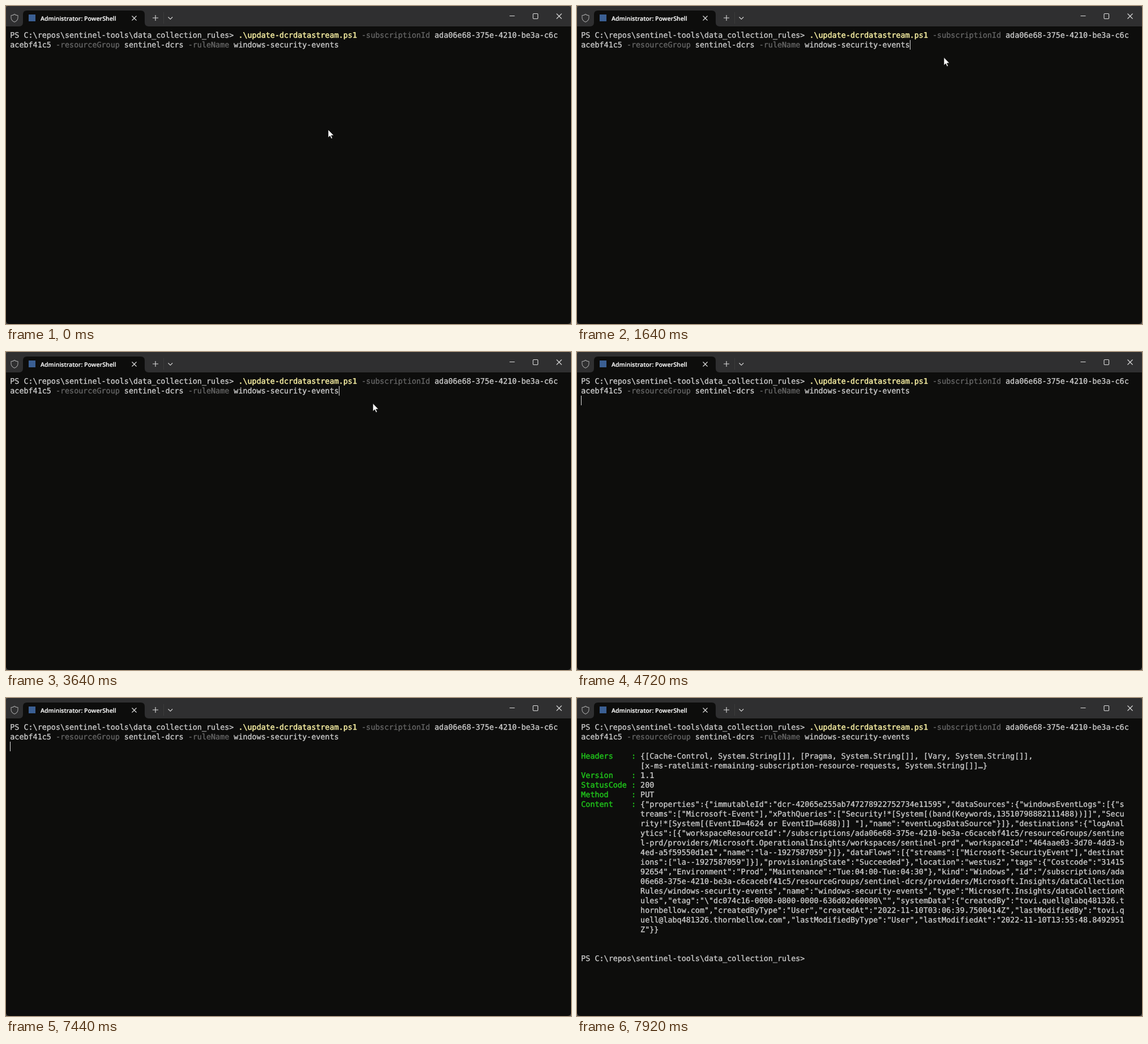
Animation of 998x561 px, one loop 8 s. Source, as an HTML page:

```html
<!DOCTYPE html>
<html lang="en">
<meta charset="utf-8">
<title>Terminal</title>
<style>
html, body { margin: 0; width: 100%; height: 100%; overflow: hidden; background: #444; }
#window { position: absolute; left: 0; top: 0; width: 998px; height: 561px; overflow: hidden;
  border-radius: 6px; background: #0d0d0c; }
svg { position: absolute; left: 0; top: 0; }
pre { position: absolute; left: 7.3px; top: 43.5px; margin: 0; color: #ccc;
  font: 13.4px/17.03px "DejaVu Sans Mono", monospace; text-rendering: geometricPrecision;
  font-variant-ligatures: none; -webkit-text-stroke: .35px; }
pre i { font-style: normal; color: #666; }
pre b { font-weight: normal; color: #f4eca0; -webkit-text-stroke-width: .5px; }
pre u { text-decoration: none; color: #1fc01a; -webkit-text-stroke-width: .5px; }
#caret { position: absolute; width: 1px; height: 17px; background: #ddd; }
</style>
<div id="window">
<svg width="998" height="561" fill="none" stroke="#ddd" stroke-width="1.1">
  <rect width="998" height="36" fill="#2f2f30" stroke="none"/>
  <path d="M23 36q7 0 7-7V15q0-7 7-7H238q7 0 7 7V29q0 7 7 7z" fill="#0d0d0c" stroke="none"/>
  <path d="M15 14.5q2.5 2 6 2.3v4q0 5-6 7.5-6-2.5-6-7.5v-4q3.5-.3 6-2.3z" stroke="#a0a0a0"/>
  <rect x="40" y="15" width="12" height="12" fill="#3b5f93" stroke="none"/>
  <text x="61" y="26" fill="#fff" stroke="#fff" stroke-width=".2" font-family="Open Sans, sans-serif" font-weight="600"
    font-size="10.6" text-rendering="geometricPrecision">Administrator: PowerShell</text>
  <path d="M222.5 17.5l8 8m0-8l-8 8M259 21h10m-5-5v10M286.5 19.5l3.8 3.8 3.8-3.8"/>
  <path d="M278.5 11v20" stroke="#3c3c3c"/>
  <path d="M889.5 17.5h9M972.5 13.5l9 9m0-9l-9 9"/>
  <rect x="931" y="13.5" width="8.5" height="9" rx="1.2"/>
</svg>
<pre>PS C:\repos\sentinel-tools\data_collection_rules> <b>.\update-dcrdatastream.ps1</b> <i>-subscriptionId</i> ada06e68-375e-4210-be3a-c6c
acebf41c5 <i>-resourceGroup</i> sentinel-dcrs <i>-ruleName</i> windows-security-events
<span id="output">
<u>Headers    :</u> {[Cache-Control, System.String[]], [Pragma, System.String[]], [Vary, System.String[]],
             [x-ms-ratelimit-remaining-subscription-resource-requests, System.String[]]…}
<u>Version    :</u> 1.1
<u>StatusCode :</u> 200
<u>Method     :</u> PUT
<u>Content    :</u> {"properties":{"immutableId":"dcr-42065e255ab747278922752734e11595","dataSources":{"windowsEventLogs":[{"s
             treams":["Microsoft-Event"],"xPathQueries":["Security!*[System[(band(Keywords,13510798882111488))]]","Secu
             rity!*[System[(EventID=4624 or EventID=4688)]] "],"name":"eventLogsDataSource"}]},"destinations":{"logAnal
             ytics":[{"workspaceResourceId":"/subscriptions/ada06e68-375e-4210-be3a-c6cacebf41c5/resourceGroups/sentine
             l-prd/providers/Microsoft.OperationalInsights/workspaces/sentinel-prd","workspaceId":"464aae03-3d70-4dd3-b
             4ed-a5f59550d1e1","name":"la--1927587059"}]},"dataFlows":[{"streams":["Microsoft-SecurityEvent"],"destinat
             ions":["la--1927587059"]}],"provisioningState":"Succeeded"},"location":"westus2","tags":{"Costcode":"31415
             92654","Environment":"Prod","Maintenance":"Tue:04:00-Tue:04:30"},"kind":"Windows","id":"/subscriptions/ada
             06e68-375e-4210-be3a-c6cacebf41c5/resourceGroups/sentinel-dcrs/providers/Microsoft.Insights/dataCollection
             Rules/windows-security-events","name":"windows-security-events","type":"Microsoft.Insights/dataCollectionR
             ules","etag":"\"dc074c16-0000-0800-0000-636d02e60000\"","systemData":{"createdBy":"tovi.quell@labq481326.t
             hornbellow.com","createdByType":"User","createdAt":"2022-11-10T03:06:39.7500414Z","lastModifiedBy":"tovi.q
             uell@labq481326.thornbellow.com","lastModifiedByType":"User","lastModifiedAt":"2022-11-10T13:55:48.8492951
             Z"}}

</span>
<span id="prompt">PS C:\repos\sentinel-tools\data_collection_rules></span></pre>
<div id="caret"></div>
<svg id="mouse" width="14" height="20" overflow="visible">
  <path d="M0 0V14.3L3.3 11.2 5.5 16.2 7.7 15.2 5.6 10.4H10.2z" fill="#fff" stroke="#000" stroke-width=".8"/>
</svg>
</div>
<script>
const LOOP = 8000, TICK = 40, ENTER = 4360, OUTPUT = 7600, PROMPT = 7640;
// Moments at which the caret blinks on and off, starting hidden.
const blinks = [640, 1120, 1640, 2200, 2640, 3160, 3600, 4040, ENTER, 5000, 5440, 5920, 6560, 7040, 7440, 7920];
const [output, prompt, caret, mouse] = ["output", "prompt", "caret", "mouse"].map(id => document.getElementById(id));

const show = (el, on) => el.style.visibility = on ? "visible" : "hidden";
const place = (el, x, y) => el.style.transform = `translate(${x}px, ${y}px)`;
const smooth = p => p * p * (3 - 2 * p);

function caretCell(t) {
  if (t < ENTER) return [72, 1];
  if (t < OUTPUT) return [0, 2];
  return t < PROMPT ? [0, 23] : [50, 24];
}

function draw(now) {
  const t = Math.floor(now % LOOP / TICK) * TICK;
  show(output, t >= OUTPUT);
  show(prompt, t >= PROMPT);

  const [col, row] = caretCell(t);
  show(caret, blinks.filter(b => b <= t).length % 2);
  place(caret, Math.floor(7.5 + col * 8.065), Math.round(43 + row * 17.03));

  const p = smooth(Math.min(1, t / 320));
  show(mouse, t < ENTER);
  place(mouse, 569 + 79 * p, 218 - 127.5 * p);
  requestAnimationFrame(draw);
}
requestAnimationFrame(draw);
</script>
</html>
```
